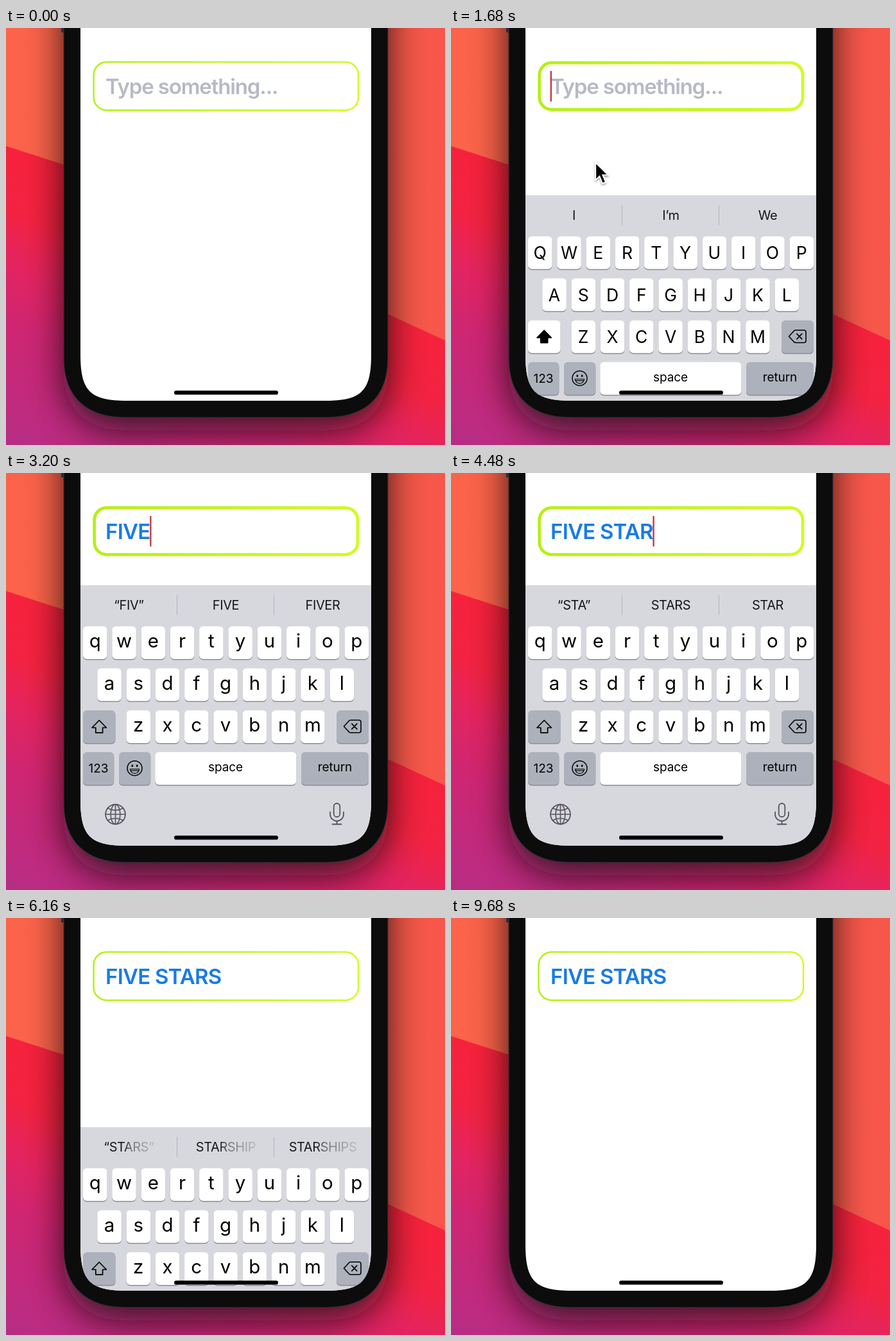
Recreate the animation shown at these times as an HTML page. Size 684x650 px, loop 9760 ms.

```html
<!DOCTYPE html>
<html lang="en">
<head>
<meta charset="utf-8">
<title>Text field focus</title>
<style>
html, body { margin: 0; width: 100%; height: 100%; overflow: hidden; }
svg { display: block; width: 684px; height: 650px; font-family: Inter, "Liberation Sans", sans-serif; }
text { white-space: pre; }
.field { font-size: 33px; font-weight: 600; letter-spacing: -.75px; fill: #187be6; }
.field.empty { letter-spacing: -1.15px; fill: #b7bac4; }
.mid { text-anchor: middle; }
.hint { font-size: 20px; letter-spacing: -.4px; fill: url(#wipe); }
.label { font-size: 19px; letter-spacing: -.1px; }
.line { fill: none; stroke-linecap: round; stroke-linejoin: round; }
</style>
</head>
<body>
<svg viewBox="0 0 684 650">
  <defs>
    <linearGradient id="orange">
      <stop stop-color="#fb644a"/><stop offset="1" stop-color="#f6574a"/>
    </linearGradient>
    <linearGradient id="red" gradientUnits="userSpaceOnUse" x1="0" y1="190" x2="-172" y2="572">
      <stop stop-color="#f6223d"/><stop offset=".2" stop-color="#f22342"/>
      <stop offset=".37" stop-color="#e4245f"/><stop offset=".57" stop-color="#d02672"/>
      <stop offset="1" stop-color="#b62d85"/>
    </linearGradient>
    <linearGradient id="lime" gradientUnits="userSpaceOnUse" x1="136" y1="0" x2="550" y2="0">
      <stop stop-color="#b4f012"/><stop offset="1" stop-color="#d0fc20"/>
    </linearGradient>
    <linearGradient id="wipe">
      <stop stop-color="#151518"/><stop stop-color="#151518" stop-opacity=".5"/>
      <stop offset="1" stop-color="#151518" stop-opacity=".15"/>
    </linearGradient>
    <filter id="blur" filterUnits="userSpaceOnUse" x="-60" y="-300" width="800" height="1150">
      <feGaussianBlur stdDeviation="28"/>
    </filter>
    <filter id="soft" x="-50%" y="-50%" width="200%" height="200%">
      <feDropShadow dx="0" dy="2" stdDeviation="1.6" flood-opacity=".4"/>
    </filter>
    <path id="body" d="M90-200V515C90 575 125 607 185 607H500C560 607 595 575 595 515V-200Z"/>
    <path id="glass" d="M116-10V509C116 566 131 581 188 581H497C554 581 569 566 569 509V-10Z"/>
    <clipPath id="screen"><use href="#glass"/></clipPath>
  </defs>

  <rect width="684" height="650" fill="url(#orange)"/>
  <path d="M0 184L90 213Q350 330 595 446L684 487V650H0Z" fill="url(#red)"/>
  <use href="#body" y="20" filter="url(#blur)" fill="#080810" opacity=".78"/>
  <rect x="86" y="-10" width="6" height="17" rx="2" fill="#252b4a"/>
  <use href="#body" fill="#0c0c0c" stroke="#3a2f3a" stroke-width="1.2"/>
  <use href="#glass" fill="#fff"/>

  <g clip-path="url(#screen)">
    <rect id="border" fill="none" stroke="url(#lime)"/>
    <text id="value" x="155" y="102.5"></text>
    <rect id="caret" y="67" width="2.4" height="47.5" fill="#c23a40"/>
    <g id="board"></g>
  </g>
  <rect x="262" y="565.3" width="162" height="6.2" rx="3.1"/>
  <path id="mouse" d="M0 0V27L6.2 21.2L10.7 32.5L15.6 30.4L11 19.4H19.4Z"
    stroke="#fff" stroke-width="1.8" filter="url(#soft)"/>
</svg>

<script>
const LOOP = 9760, STEP = 80;
const FOCUS = 1520, RETURN = 6089, FIRST_KEY = 2360, KEY_GAP = 260, HINT_LAG = 120;
const PHRASE = "FIVE STARS";
const HINTS = [
  "I|I’m|We", "“F”|For|From", "“FI”|FIRST|FIND", "“FIV”|FIVE|FIVER", "“FIVE”|FIVE|FIVES",
  "MINUTES|YEARS|DAYS", "“S”|SO|SHE", "“ST”|STILL|START", "“STA”|STARS|STAR",
  "“STAR”|STARS|START", "“STARS”|STARSHIP|STARSHIPS"
].map(s => s.split("|"));
const $ = id => document.getElementById(id);
const board = $("board");

function add(tag, attrs, content = "", parent = board) {
  const el = document.createElementNS("http://www.w3.org/2000/svg", tag);
  for (const name in attrs) el.setAttribute(name, attrs[name]);
  el.textContent = content;
  return parent.appendChild(el);
}
function key(x, y, width, fill = "#fff") {
  add("rect", { x, y: y + 1.5, width, height: 51, rx: 6, fill: "#8b8d94" });
  return add("rect", { x, y, width, height: 51, rx: 6, fill });
}
const label = (x, y, s, cls = "label") => add("text", { x, y, class: "mid " + cls }, s);
const line = (d, stroke, width) => add("path", { d, stroke, "stroke-width": width, class: "line" });

const GREY = "#adb1bc", ICON = "#58535c";
add("rect", { x: 116, y: 175, width: 453, height: 420, fill: "#d7d8de" });
for (const x of [266.5, 417.5]) line(`M${x} 191V221`, "#b2b4bb", 1);
const hints = [191.5, 342.5, 493.5].map(x => label(x, 213, "", "hint"));

const letters = [];
[["QWERTYUIOP", 120, 239], ["ASDFGHJKL", 142.3, 304.5], ["ZXCVBNM", 187.5, 370]].forEach(([row, x0, y]) => {
  [...row].forEach((c, i) => {
    const x = x0 + i * 45.28;
    key(x, y, 37.5);
    letters.push({ c, y, el: add("text", { x: x + 18.7, class: "mid" }) });
  });
});

const shiftKey = key(120, 370, 50.5, GREY);
const arrow = add("path", {
  d: "M145.2 385.5L156.4 397H150.6V404.8H139.8V397H134Z",
  stroke: "#000", "stroke-width": 1.7, "stroke-linejoin": "round"
});
key(515, 370, 50, GREY);
line("M526.5 395L534.5 386.3Q535.5 385.2 537 385.2H550Q553 385.2 553 388.2V401.7Q553 404.7 550 404.7H537Q535.5 404.7 534.5 403.7ZM538.8 390.9L546.8 399.1M546.8 390.9L538.8 399.1", "#000", 1.6);

key(120, 435, 48.3, GREY);
key(176, 435, 49.3, GREY);
key(232.3, 435, 220, "#fff");
key(460, 435, 105, GREY);
label(144, 467, "123");
label(342, 465.3, "space");
label(512.5, 465.3, "return");

add("circle", { cx: 200.5, cy: 460.2, r: 11.5, fill: "none", stroke: "#000", "stroke-width": 1.5 });
for (const cx of [196.8, 204.2]) add("ellipse", { cx, cy: 456.4, rx: 1.3, ry: 1.9 });
line("M193.3 461.5H207.7Q206.5 468.3 200.5 468.3T193.3 461.5M194.8 463.8H206.2", "#000", 1.2);

add("circle", { cx: 170.5, cy: 532, r: 15.4, fill: "none", stroke: ICON, "stroke-width": 1.8 });
add("ellipse", { cx: 170.5, cy: 532, rx: 7.4, ry: 15.4, fill: "none", stroke: ICON, "stroke-width": 1.6 });
line("M170.5 517V547.5M155 532H186M158.5 522.5Q170.5 529 182.5 522.5M158.5 541.5Q170.5 535 182.5 541.5", ICON, 1.6);
add("rect", { x: 510.7, y: 515, width: 9.6, height: 21, rx: 4.8, fill: "none", stroke: ICON, "stroke-width": 1.8 });
line("M505 528.5V532A10.5 10.5 0 0 0 526 532V528.5M515.5 542.5V547.5M508.5 547.5H522.5", ICON, 1.8);

function setCase(upper) {
  for (const { c, y, el } of letters) {
    el.textContent = upper ? c : c.toLowerCase();
    el.setAttribute("y", y + (upper ? 35.3 : 33));
    el.setAttribute("font-size", upper ? 26.5 : 29.5);
  }
  shiftKey.setAttribute("fill", upper ? "#fff" : GREY);
  arrow.setAttribute("fill", upper ? "#000" : "none");
}

const clamp = (v, lo, hi) => Math.min(hi, Math.max(lo, v));
const ease = p => p * p * (3 - 2 * p);
// Critically damped spring, 0 to 1.
function spring(ms) {
  const x = Math.max(0, ms) * .01826;
  return 1 - (1 + x) * Math.exp(-x);
}
const typedAt = t => clamp(Math.floor((t - FIRST_KEY) / KEY_GAP) + 1, 0, PHRASE.length);

// time, x, y of the pointer tip
const TRACK = [[800, 300, 665], [1200, 239, 115], [1360, 234, 96], [1600, 234, 96], [1880, 190, 670]];
function pointer(t) {
  const i = TRACK.findIndex(p => p[0] > t);
  if (i < 1) return [0, -100];
  const [a, b] = [TRACK[i - 1], TRACK[i]];
  const p = ease((t - a[0]) / (b[0] - a[0]));
  return [a[1] + (b[1] - a[1]) * p, a[2] + (b[2] - a[2]) * p];
}

const value = $("value"), caret = $("caret"), border = $("border");
const stops = $("wipe").children;
let upperShown;

function draw(t) {
  const focused = t >= FOCUS && t < RETURN;
  const n = typedAt(t);

  const w = 2.5 + 2.2 * (focused ? clamp((t - FOCUS) / 160, 0, 1) : 0);
  const box = { x: 135.3 + w / 2, y: 51.8 + w / 2, width: 415 - w, height: 77.6 - w, rx: 21.5 - w / 2, "stroke-width": w };
  for (const k in box) border.setAttribute(k, box[k]);

  value.textContent = n ? PHRASE.slice(0, n) : "Type something...";
  value.setAttribute("class", n ? "field" : "field empty");
  const lastKey = n ? FIRST_KEY + (n - 1) * KEY_GAP : FOCUS;
  caret.setAttribute("x", 154.6 + (n ? value.getComputedTextLength() : 0));
  caret.setAttribute("opacity", focused && (t - lastKey) % 1000 < 560 ? 1 : 0);

  const shown = spring(t - FOCUS) - spring(t - RETURN);
  board.setAttribute("transform", `translate(0 ${406 * (1 - shown)})`);
  if (upperShown !== !n) setCase(upperShown = !n);

  HINTS[typedAt(t - HINT_LAG)].forEach((s, i) => hints[i].textContent = s);
  const edge = t < RETURN ? 1 : clamp(.75 - (t - RETURN) / 200, 0, 1);
  stops[0].setAttribute("offset", edge);
  stops[1].setAttribute("offset", Math.min(1, edge + .15));

  $("mouse").setAttribute("transform", `translate(${pointer(t)})`);
}

const start = performance.now();
function tick() {
  const t = (performance.now() - start) % LOOP;
  draw(Math.floor(t / STEP) * STEP);
  requestAnimationFrame(tick);
}
tick();
</script>
</body>
</html>
```
